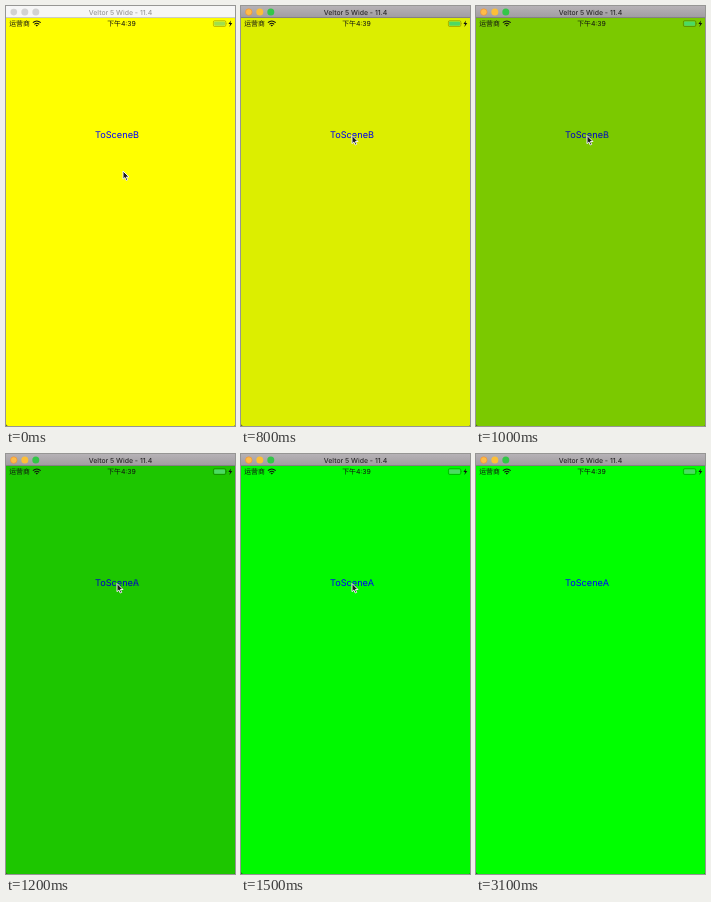
These frames come from a looping animation (229x420 px, 3.2 s). An HTML page:

```html
<!DOCTYPE html>
<html lang="zh-CN">
<head>
<meta charset="utf-8">
<title>Scene cross-fade</title>
<style>
  html, body { margin: 0; width: 100%; height: 100%; overflow: hidden; background: #444; }
  svg { display: block; width: 229px; height: 420px; }
  text { text-anchor: middle; text-rendering: geometricPrecision; }
  .title { font: 500 6.9px Inter, sans-serif; fill: #2c2a2c; }
  .label { font: 9.2px Inter, sans-serif; fill: #00f; }
  .status { font: 6.9px Inter, "Noto Sans CJK SC", "Noto Sans CJK", sans-serif; fill: #111; }
  .carrier { text-anchor: start; }
  .level { fill: #4cd964; }
  .inactive .bar { fill: #f6f6f6; }
  .inactive .dot { fill: #d2d2d2; stroke: none; }
  .inactive .title { fill: #999; }
  .inactive .level { fill: #a0df4c; }
</style>
</head>
<body>
<svg id="stage" viewBox="0 0 229 420">
  <defs>
    <linearGradient id="metal" x2="0" y2="1">
      <stop offset="0" stop-color="#b6b2b6"/>
      <stop offset="1" stop-color="#a09ca0"/>
    </linearGradient>
    <clipPath id="screen"><path d="M0 12H229V419Q229 420 228 420H2Q0 420 0 418Z"/></clipPath>
  </defs>

  <g clip-path="url(#screen)">
    <rect y="12" width="229" height="408"/>
    <g id="sceneA">
      <rect y="12" width="229" height="408" fill="#ff0"/>
      <text class="label" x="111" y="131.800">ToSceneB</text>
    </g>
    <g id="sceneB">
      <rect y="12" width="229" height="408" fill="#0f0"/>
      <text class="label" x="111" y="131.800">ToSceneA</text>
    </g>
  </g>

  <rect class="bar" width="229" height="12" fill="url(#metal)"/>
  <path d="M0 11.600H229" stroke="#000" stroke-opacity=".25" stroke-width=".8"/>
  <circle class="dot" cx="7.800" cy="6.100" r="3.300" fill="#fdbc4a" stroke="#ee8a34" stroke-width=".6"/>
  <circle class="dot" cx="18.800" cy="6.100" r="3.500" fill="#fcbf38"/>
  <circle class="dot" cx="29.800" cy="6.100" r="3.500" fill="#33c648"/>
  <text class="title" x="114.500" y="8.700">Veltor 5 Wide - 11.4</text>

  <text class="status carrier" x="3.200" y="20.300">运营商</text>
  <text class="status" x="115.500" y="20.300">下午4:39</text>
  <g fill="none" stroke="#111" stroke-width="1.100">
    <path d="M26.900 16.700Q30.800 13.400 34.700 16.700M28.400 18.300Q30.800 16.300 33.200 18.300"/>
    <path d="M30.800 20.600L29.500 19.300Q30.800 18.300 32.100 19.300Z" fill="#111" stroke="none"/>
  </g>
  <rect x="207.400" y="14.700" width="12.400" height="5.800" rx="1.300" fill="none" stroke="#000" stroke-opacity=".4" stroke-width=".6"/>
  <rect class="level" x="208.200" y="15.500" width="10.800" height="4.200" rx=".7"/>
  <path d="M220.500 16.600Q221.500 17.600 220.500 18.600Z" fill-opacity=".4"/>
  <path d="M225 14.500L222.400 18.100H224.100L223.400 20.900L226.300 17.100H224.500Z" fill="#111"/>

  <path id="cursor" d="M0 0V8.200L1.900 6.500L3.200 9.500L4.700 8.900L3.400 6H6Z" fill="#1c1c1c" stroke="#eee" stroke-width="1" stroke-linejoin="round"/>
</svg>
<script>
  const LOOP = 3200, STEP = 100;
  const FADE_START = 610, FADE_TIME = 1000, ACTIVATE = 200;
  // Cursor stops: time, x, y
  const path = [
    [100, 117, 165], [300, 115, 152], [500, 111, 129.5], [1900, 111, 129.5],
    [2000, 118, 133], [2200, 154.5, 152], [2400, 186, 345], [2500, 195, 425]
  ];
  const get = id => document.getElementById(id);
  const stage = get('stage'), sceneA = get('sceneA'), sceneB = get('sceneB'), cursor = get('cursor');
  const clamp = v => Math.min(1, Math.max(0, v));
  const easeInOut = u => u < .5 ? 2 * u * u : 1 - 2 * (1 - u) ** 2;

  function cursorAt(t) {
    const next = path.findIndex(p => p[0] > t);
    if (next === 0) return path[0].slice(1);
    if (next < 0) return path[path.length - 1].slice(1);
    const [t0, x0, y0] = path[next - 1], [t1, x1, y1] = path[next];
    const k = (t - t0) / (t1 - t0);
    return [x0 + (x1 - x0) * k, y0 + (y1 - y0) * k];
  }

  function draw(t) {
    const fade = easeInOut(clamp((t - FADE_START) / FADE_TIME));
    sceneA.setAttribute('opacity', 1 - fade);
    sceneB.setAttribute('opacity', fade);
    stage.classList.toggle('inactive', t < ACTIVATE);
    cursor.setAttribute('transform', `translate(${cursorAt(t)})`);
  }

  const start = performance.now();
  function tick() {
    const t = (performance.now() - start) % LOOP;
    draw(Math.floor(t / STEP) * STEP);
    requestAnimationFrame(tick);
  }
  tick();
</script>
</body>
</html>
```
